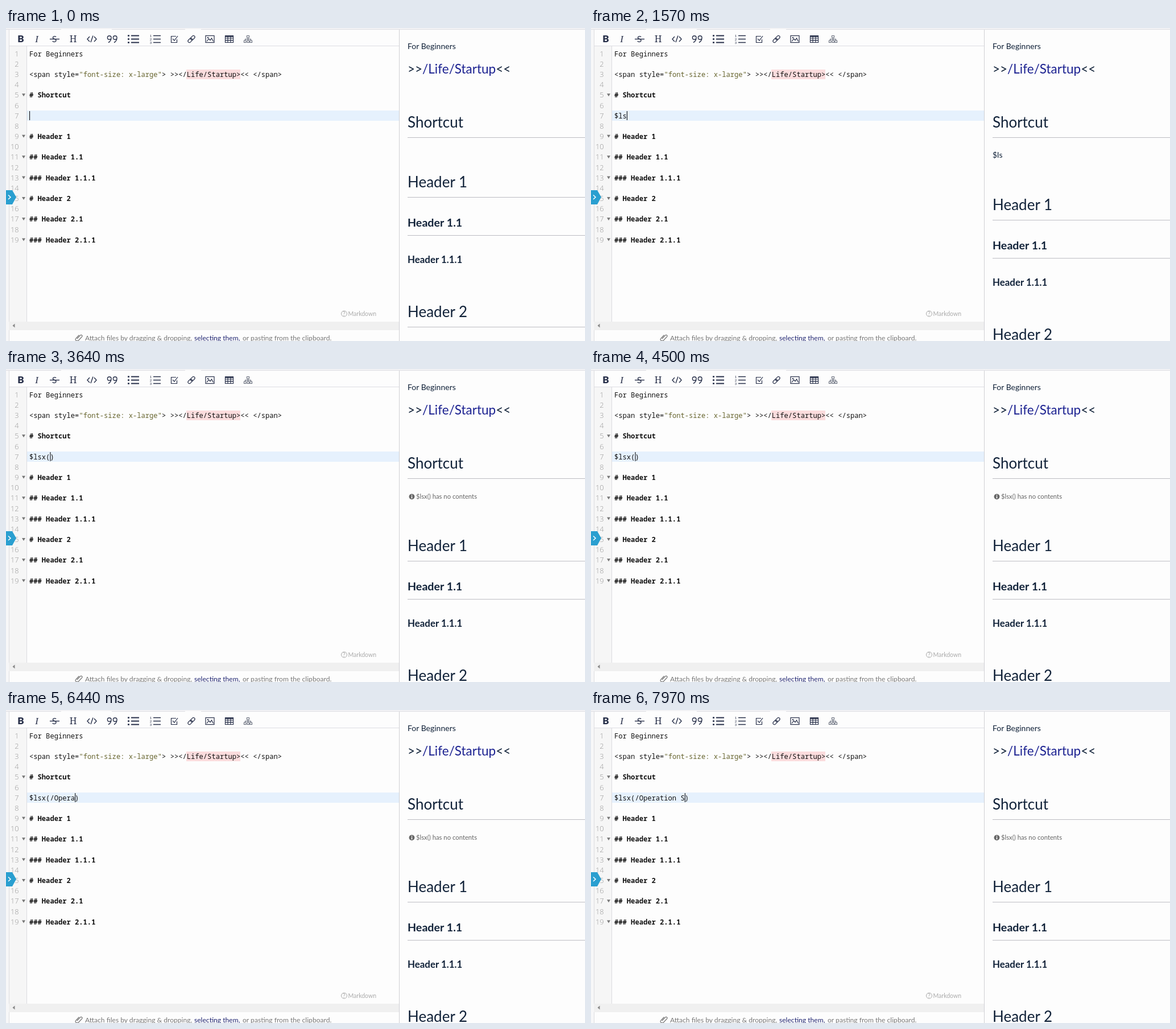
Recreate the animation shown at these times as an HTML page. Size 1018x550 px, loop 8000 ms.

```html
<!DOCTYPE html>
<html lang="en">
<head>
<meta charset="utf-8">
<title>Markdown editor</title>
<style>
  html, body { margin: 0; width: 100%; height: 100%; overflow: hidden; background: #fdfdfd; }
  svg { display: block; width: 1018px; height: 550px; }
  text { white-space: pre; font-family: Lato, sans-serif; fill: #112239; }
  .code { font-family: "Noto Sans Mono", monospace; font-size: 12.14px; fill: #111; }
  .num { font: 300 12.8px "Open Sans", sans-serif; fill: #999; text-anchor: end; }
  .bold { font-weight: 700; }
  .str { fill: #67652f; }
  .body { font-size: 14px; }
  .large { font-size: 22.5px; }
  .h1 { font-size: 26px; }
  .h2 { font-size: 19.7px; font-weight: 700; }
  .h3 { font-size: 16.9px; font-weight: 700; }
  .link { fill: #1c2291; }
  .note { font-size: 11.3px; fill: #666; }
  .hint { font-size: 10.5px; fill: #aaa; }
  .attach { font-size: 12.1px; fill: #777; }
  .attach.link { fill: #1c226f; }
  .icons { fill: none; stroke: #28304a; stroke-width: 1.4; }
  .icons text { fill: #28304a; stroke: none; text-anchor: middle; }
</style>
</head>
<body>
<svg viewBox="0 0 1018 550">
  <rect width="1018" height="550" fill="#fdfdfd"/>
  <rect width="1018" height="2" fill="#f3f3f5"/>
  <path d="M0 2.5H97M186 2.5H315M343 2.5H1018" stroke="#dedee3"/>
  <rect y="3" width="5" height="547" fill="#f7f7f8"/>
  <rect x="5" y="32" width="32" height="484" fill="#f6f6f6"/>
  <path d="M36.5 32V516M5.5 3V550" stroke="#dcdce0"/>
  <path d="M5 31.5H691" stroke="#dddde3"/>
  <rect x="37" y="145" width="654" height="18" fill="#e6f1fd"/>
  <rect x="317" y="73" width="95" height="17" fill="#fbdcdd"/>
  <rect x="5" y="516" width="686" height="15" fill="#f0f0f0"/>
  <path d="M15.5 519.5V526.5L11.5 523Z" fill="#888"/>
  <path d="M691.5 3V550" stroke="#cfcfd4"/>

  <g class="icons">
    <text x="26" y="25" font-size="17" font-weight="900">B</text>
    <text x="54" y="25" style="font:italic 17px 'Liberation Serif',serif">I</text>
    <text x="85" y="25" font-size="16">S</text>
    <path d="M77 19.5H94"/>
    <text x="118" y="25" style="font:16px 'Noto Serif',serif">H</text>
    <path d="M147 15L143 19.5L147 24M155 15L159 19.5L155 24M153 13.5L149 25"/>
    <path id="quote" d="M185 17a3.3 3.3 0 1 0-6.6 0a3.3 3.3 0 0 0 6.6 0Q185 23 180 25.5"/>
    <use href="#quote" x="10"/>
    <path d="M220 13.5H234M220 19.5H234M220 25.5H234" stroke-width="1.8"/>
    <path d="M214 13.5H217M214 19.5H217M214 25.5H217" stroke-width="2.6"/>
    <path d="M259 13.5H272M259 19.5H272M259 25.5H272"/>
    <text x="254.5" y="16" font-size="6">1</text>
    <text x="254.5" y="22" font-size="6">2</text>
    <text x="254.5" y="28" font-size="6">3</text>
    <path d="M299 14.5H290.5V25.5H300.5V20M293 19L296 22L302 14" stroke-width="1.2"/>
    <g transform="rotate(-45 326 19.5)" stroke-width="1.2">
      <rect x="318.5" y="17" width="8.5" height="5" rx="2.5"/>
      <rect x="325" y="17" width="8.5" height="5" rx="2.5"/>
    </g>
    <rect x="351" y="13.5" width="15" height="12" stroke-width="1.2"/>
    <path d="M353 23.5L356.5 19L359 21.5L361.5 18L364.5 23.5" stroke-width="1.2"/>
    <circle cx="355" cy="17" r="1.2" fill="#28304a" stroke="none"/>
    <path d="M385.5 13.5H399.5V25.5H385.5ZM385.5 18H399.5M385.5 21.7H399.5M390 14V25.5M395 14V25.5" stroke-width="1.2"/>
    <path d="M385 14.5H400" stroke-width="2.5"/>
    <path stroke="#666c7b" stroke-width="1.1" d="M423.5 13.5H427.5V17H423.5ZM425.5 17V22M420.5 22V19.5H430.5V22M418.5 22H422V25.5H418.5ZM424 22H427.5V25.5H424ZM429 22H432.5V25.5H429Z"/>
  </g>

  <g id="editor"></g>
  <rect id="caret" y="146" width="1.1" height="16" fill="#111"/>

  <path d="M0 285H11L18 297.3L11 310H0Z" fill="#2a9fd0"/>
  <path d="M4 293.5L8 297.3L4 301" fill="none" stroke="#fff" stroke-width="1.5"/>

  <circle cx="594.5" cy="502" r="5" fill="none" stroke="#aaa"/>
  <text class="hint" x="592" y="505.5" font-size="9">?</text>
  <text class="hint" x="601.5" y="506">Markdown</text>
  <path d="M125 546L130 540.5Q132 538.5 133.5 540T133 543L127.5 549Q125 550.5 123 549T123 545.5L128.5 539.5" fill="none" stroke="#777" stroke-width="1.2"/>
  <text class="attach" x="139" y="549">Attach files by dragging &amp; dropping,</text>
  <text class="attach link" x="331" y="549">selecting them,</text>
  <text class="attach" x="416" y="549">or pasting from the clipboard.</text>

  <text class="body" x="706" y="36.5">For Beginners</text>
  <text class="large" x="706" y="80">&gt;&gt;<tspan class="link">/Life/Startup</tspan>&lt;&lt;</text>
  <text class="h1" x="706" y="174.8">Shortcut</text>
  <path d="M706 192.5H1018" stroke="#bcbcc2"/>
  <text id="plain" class="body" x="706" y="228"></text>
  <g id="empty">
    <circle cx="713.5" cy="224.3" r="4.9" fill="#666"/>
    <path d="M713.5 221V222.6M713.5 223.6V227.5" stroke="#fff" stroke-width="1.6"/>
    <text class="note" x="721" y="228">$lsx() has no contents</text>
  </g>
  <g id="below">
    <text class="h1" x="706" y="279.8">Header 1</text>
    <text class="h2" x="706" y="349">Header 1.1</text>
    <text class="h3" x="706" y="412.7">Header 1.1.1</text>
    <text class="h1" x="706" y="507.6">Header 2</text>
    <path d="M706 297.5H1018M706 364.5H1018M706 525.5H1018" stroke="#bcbcc2"/>
  </g>
</svg>
<script>
const LOOP = 8000, BLINK = 530, LAG = 120;
const LEFT = 41, CHAR = 7.284, ROW = 18.17;
const $ = id => document.getElementById(id);
const baseline = row => 49.5 + ROW * (row - 1);

function add(tag, attrs, content = '') {
  const el = document.createElementNS('http://www.w3.org/2000/svg', tag);
  for (const key in attrs) el.setAttribute(key, attrs[key]);
  el.textContent = content;
  $('editor').append(el);
  return el;
}

const code = (row, column, content, style = '') =>
  add('text', { class: 'code ' + style, x: LEFT + CHAR * column, y: baseline(row) }, content);

const headings = {
  5: '# Shortcut', 9: '# Header 1', 11: '## Header 1.1', 13: '### Header 1.1.1',
  15: '# Header 2', 17: '## Header 2.1', 19: '### Header 2.1.1'
};

for (let row = 1; row <= 19; row++) {
  const y = baseline(row);
  add('text', { class: 'num', x: 22.5, y: y + 0.2 }, row);
  if (headings[row]) {
    code(row, 0, headings[row], 'bold');
    add('path', { d: `M28 ${y - 7}h6l-3 5z`, fill: '#777' });
  }
}
code(1, 0, 'For Beginners');
code(3, 0, '<span style=');
code(3, 12, '"font-size: x-large"', 'str');
code(3, 32, '> >></Life/Startup><< </span>');
const typedLine = code(7, 0, '');

// Each step: time, text before the caret, text after it.
const steps = [[0, '', ''], [920, '$', ''], [1180, '$l', ''], [1380, '$ls', ''],
  [1800, '$lsx', ''], [2180, '$lsx(', ''], [2560, '$lsx()', ''], [3400, '$lsx(', ')']];
const keyTimes = [4800, 5120, 5500, 5800, 6050, 6300, 6640, 6850, 7050, 7250, 7550, 7850];
keyTimes.forEach((time, i) =>
  steps.push([time, '$lsx(' + '/Operation S'.slice(0, i + 1), ')']));

const stepAt = time => steps.findLast(step => step[0] <= time) || steps[0];

function draw(time) {
  const [since, before, after] = stepAt(time);
  typedLine.textContent = before + after;
  $('caret').setAttribute('x', LEFT + CHAR * before.length);
  $('caret').style.opacity = Math.floor((time - since) / BLINK) % 2 ? 0 : 1;

  // The preview follows the editor with a short delay.
  const [, head, tail] = stepAt(time - LAG);
  const shown = head + tail;
  const isCall = shown.endsWith(')');
  $('plain').textContent = isCall ? '' : shown;
  $('empty').style.display = isCall ? '' : 'none';
  $('below').setAttribute('transform', `translate(0 ${shown ? 40.2 : 0})`);
}

const start = performance.now();
function tick() {
  draw((performance.now() - start) % LOOP);
  requestAnimationFrame(tick);
}
tick();
</script>
</body>
</html>
```
